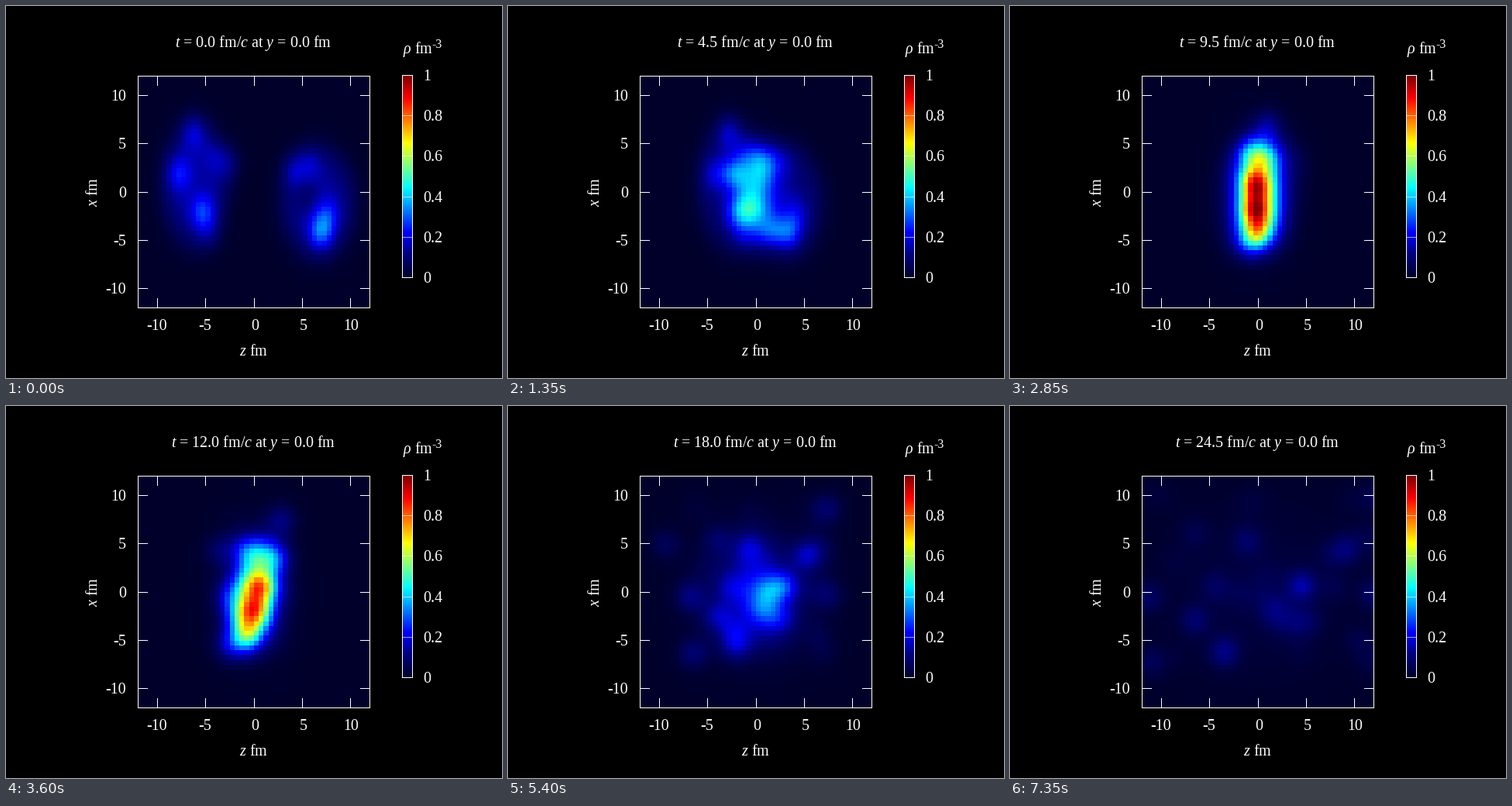
Animation, 640 px wide and 480 px high, one loop 7500 ms. Source, as a matplotlib script:

```python
import numpy as np
import matplotlib.pyplot as plt
from matplotlib.animation import FuncAnimation
from matplotlib.colors import LinearSegmentedColormap
from matplotlib.patches import Rectangle

plt.rcParams.update({
    "font.family": "Liberation Serif",
    "mathtext.fontset": "custom",
    "mathtext.rm": "Liberation Serif",
    "mathtext.it": "Liberation Serif:italic",
})

W, H, DPI = 640, 480, 100
FRAMES, STEP_MS, DT = 50, 150, 0.5
BEAM_V = 0.75          # speed of the incoming nuclei, in c
BURST = 8.2            # time at which the fragments leave z = 0
PHASES = (2, 7, 12, 15.5, 20.5, 24.5)

PALETTE = LinearSegmentedColormap.from_list("density", [
    (0, 0, 0.17), (0, 0, 0.5), (0, 0, 1), (0, 0.5, 1), (0, 1, 1),
    (0.5, 1, 0.5), (1, 1, 0), (1, 0.5, 0), (1, 0, 0), (0.5, 0, 0)], N=1024)

cells = np.linspace(-11.75, 11.75, 48)
Z, X = np.meshgrid(cells, cells)


def phase(t, *values):
    """Value at time t, linear between the phases of the collision."""
    return np.interp(t, PHASES[:len(values)], values)


def spots(z, x, peak, sz=1.0, sx=1.0):
    """Sum of Gaussian spots; z, x and peak may be arrays."""
    z, x, peak = np.atleast_1d(z, x, peak)
    gz = np.exp(-0.5 * ((cells[:, None] - z) / sz) ** 2)
    gx = np.exp(-0.5 * ((cells[:, None] - x) / sx) ** 2)
    return (gx * peak) @ gz.T


# Clusters inside each nucleus: z, x, peak
LEFT = np.array([(-6.2, 6.2, 0.11), (-7.7, 1.9, 0.12), (-4.1, 3.8, 0.05),
                 (-2.6, 3.0, 0.08), (-5.3, -2.0, 0.15), (-4.7, -4.2, 0.06)])
RIGHT = np.array([(4.1, 2.2, 0.09), (5.8, 2.9, 0.07), (5.3, -0.2, -0.05),
                  (6.9, -4.1, 0.20), (7.6, -2.3, 0.11)])

# Outgoing fragments: z velocity, x, peak
MAIN = np.array([(0.75, 9.0, 0.07), (0.56, 4.1, 0.11), (0.28, 0.6, 0.16),
                 (0.10, -1.8, 0.09), (0.26, -2.9, 0.06), (-0.07, 4.9, 0.08),
                 (-0.27, 0.5, 0.06), (-0.40, -2.7, 0.09), (-0.22, -5.8, 0.08),
                 (-0.67, -6.7, 0.07), (-0.69, -0.5, 0.08), (-0.40, 5.7, 0.05),
                 (-0.95, 5.2, 0.05)])
rng = np.random.default_rng(4)
DUST = np.column_stack([rng.uniform(-0.8, 0.8, 24), rng.uniform(-10, 10, 24),
                        rng.uniform(0.01, 0.035, 24)])


def nucleus(clusters, z, x, rz, rx, shift):
    """Flat elliptical body with brighter clusters, moved along z."""
    r2 = ((Z - z - shift) / rz) ** 2 + ((X - x) / rx) ** 2
    cz, cx, peak = clusters.T
    return 0.13 * np.exp(-r2 ** 2) + spots(cz + shift, cx, peak, 0.9, 1.3)


def fragments(group, t, gain):
    v, x, peak = group.T
    return gain * spots(v * (t - BURST), x * (1 + 0.02 * (t - 20.5)), peak,
                        1.05, 1.1)


def fireball(t):
    """Tall ridge that tilts, with three hot spots and a spreading halo."""
    tilt = phase(t, 0, 0, 0.15, 0, 0)
    width = phase(t, 1.5, 1.75, 1.5, 1.5, 2)
    ridge = np.exp(-0.5 * ((Z - tilt * X) / width) ** 2
                   - ((X + 0.3) / 5.6) ** 4)
    rho = phase(t, 0, 0.33, 0.40, 0.15, 0) * ridge
    rho += spots(0, 0, phase(t, 0, 0.05, 0.10, 0.20, 0.05, 0.03),
                 phase(t, 2, 2.4, 2.4, 2.4, 5, 6.5),
                 phase(t, 3.5, 3.8, 3.8, 3.6, 4.5, 6))
    rho += spots(phase(t, -3, -1.5, 0.5, 0.4, 2), phase(t, 2, 1.6, 0.6, 0.1),
                 phase(t, 0, 0.30, 0.12, 0.22, 0))
    rho += spots(phase(t, -1, -0.5, -0.2, 0), -1.9,
                 phase(t, 0, 0.22, 0.17, 0.05, 0))
    rho += spots(phase(t, 3, 0.9, -0.5, -1.6, -3), -3.9,
                 phase(t, 0, 0.20, 0.15, 0.13, 0))
    return rho


def density(t):
    s = BEAM_V * t
    rho = phase(t, 1, 0.45, 0) * (nucleus(LEFT, -6.1, 0.7, 3.5, 6.4, s)
                                  + nucleus(RIGHT, 6.6, -1.1, 3.9, 5.8, -s))
    rho += fireball(t)
    rho += fragments(MAIN, t, phase(t, 0, 0.8, 1.3, 1.3, 1, 0.8))
    rho += fragments(DUST, t, phase(t, 0, 0, 0.3, 0.6, 1, 1))
    return rho


fig = plt.figure(figsize=(W / DPI, H / DPI), dpi=DPI, facecolor="black")
ax = fig.add_axes([0, 0, 1, 1])
ax.axis("off")


def bar(x, y, w, h, alpha=1):
    ax.add_patch(Rectangle((x, y), w, h, fc="white", lw=0, aa=False,
                           alpha=alpha, zorder=3))


def frame(x0, y0, x1, y1):
    """One-pixel outline, both corners included."""
    for y in (y0, y1):
        bar(x0, y, x1 - x0 + 1, 1)
    for x in (x0, x1):
        bar(x, y0, 1, y1 - y0 + 1)


def label(x, y, s, ha="center", px=20, **kw):
    return ax.text(x, y, s, ha=ha, va="baseline", color="white",
                   fontsize=px * 72 / DPI, **kw)


def shade(values, *extent):
    return ax.imshow(values, cmap=PALETTE, vmin=0, vmax=1, origin="lower",
                     extent=extent, interpolation="nearest", aspect="auto")


heat = shade(density(0), 170, 470, 390, 90)
shade(np.linspace(0, 1, 260)[:, None], 512, 524, 350, 90)
ax.set_xlim(0, W)
ax.set_ylim(H, 0)

frame(170, 90, 469, 389)
for v in range(-10, 11, 5):
    offset = 299 * (v + 12) / 24
    px, py = int(170.5 + offset), int(389.5 - offset)
    for y in (90, 377):
        bar(px, y, 1, 13)
    for x in (170, 457):
        bar(x, py, 13, 1)
    label(px + (1.5 if v >= 0 else 0), 418, str(v))
    label(155, py + 7, str(v), ha="right")

frame(511, 89, 524, 350)
for k in range(6):
    y = round(350 - 52.2 * k)
    if 0 < k < 5:
        bar(512, y, 12, 1, alpha=0.6)
    label(538.5, y + 7, f"{k / 5:g}", ha="left")

label(319, 451, "$z$ fm")
label(118, 240, "$x$ fm", rotation=90, rotation_mode="anchor")
label(512, 61, "$ρ$ fm", ha="left")
label(549, 54, "-3", ha="left", px=16)
title = label(319, 53, "")


def draw(n):
    t = n * DT
    heat.set_data(density(t))
    title.set_text(f"$t$ = {t:.1f} fm/$c$ at $y$ = 0.0 fm")
    return heat, title


anim = FuncAnimation(fig, draw, frames=FRAMES, interval=STEP_MS,
                     repeat=True, repeat_delay=0, blit=False)
plt.show()
```
